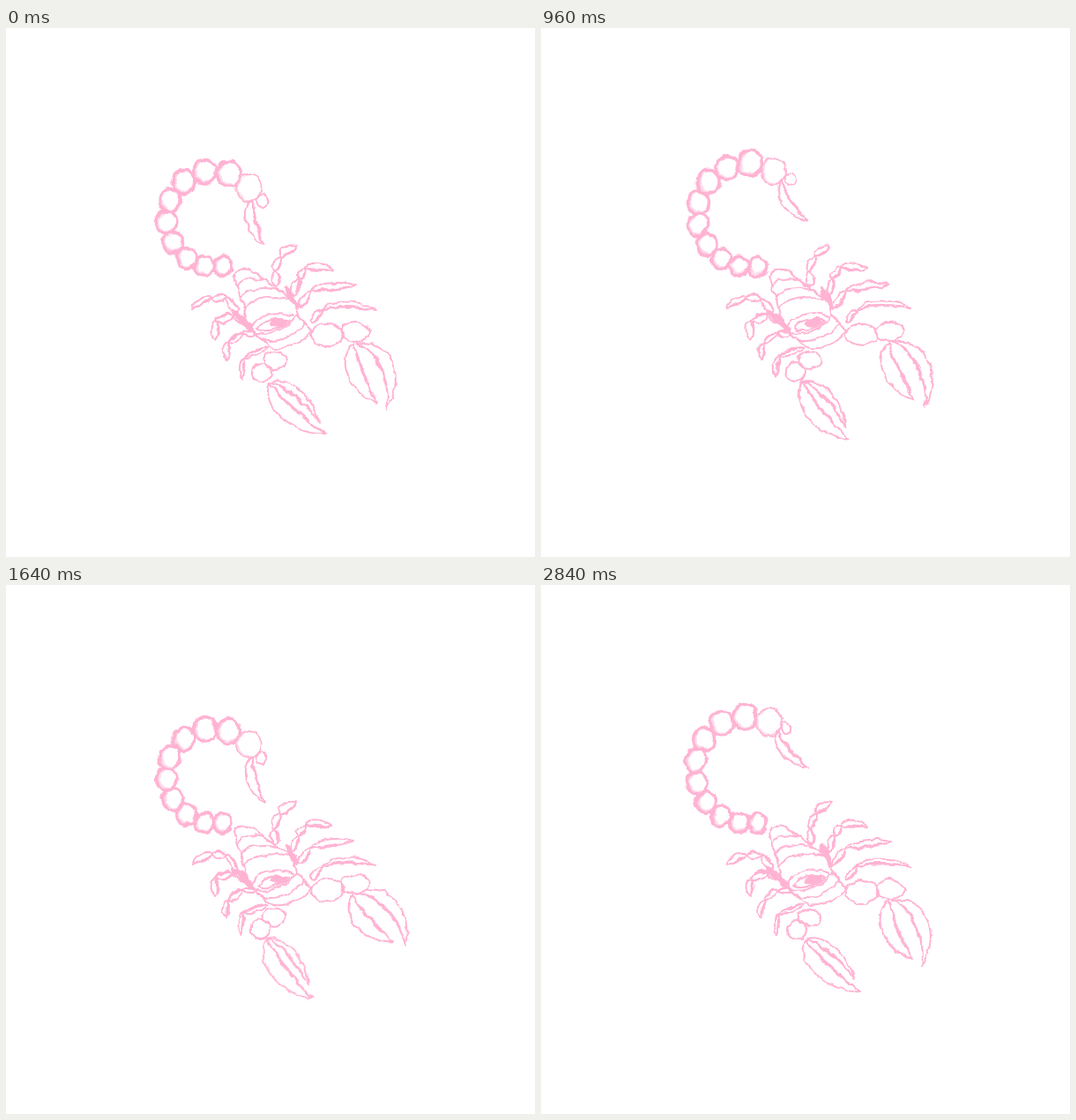
An HTML page that plays this animation: 600x600 px, repeating every 2880 ms.

```html
<!DOCTYPE html>
<html lang="en">
<head>
<meta charset="utf-8">
<title>Scorpion</title>
<style>
  html, body { margin: 0; width: 100%; height: 100%; overflow: hidden; background: #fff; }
  svg { display: block; width: 100vw; height: 100vh; }
  .ink { fill: none; stroke: #ffb3d3; stroke-width: 2; stroke-linejoin: round; stroke-linecap: round; }
  .solid { fill: #ffb3d3; }
  .rim { fill: #ffb3d3; stroke: none; }
  .light { fill: #fff; stroke: none; }
  .haze { fill: #ffdcea; stroke: none; }
  .joint { stroke-width: 13; }
</style>
</head>
<body>
<svg viewBox="0 0 600 600">
  <filter id="rough" filterUnits="userSpaceOnUse" x="0" y="0" width="600" height="600" color-interpolation-filters="sRGB">
    <feTurbulence id="noise" type="fractalNoise" baseFrequency=".09" numOctaves="2"/>
    <feDisplacementMap in="SourceGraphic" scale="6.5" xChannelSelector="R" yChannelSelector="G"/>
  </filter>
  <g class="ink" filter="url(#rough)">
    <g id="tail"></g>
    <g id="stinger"></g>
    <g id="body"></g>
    <g id="leftLegs"></g>
    <g id="lowLeg"></g>
    <g id="rightLegs"></g>
    <g id="leftArm"></g>
    <g id="leftClaw"></g>
    <g id="rightArm"></g>
    <g id="rightClaw"></g>
  </g>
</svg>
<script>
const LOOP = 2880, STEP = 40, SEGMENTS = 10, RAD = Math.PI / 180;
const $ = id => document.getElementById(id);
const path = (d, kind = "") => `<path class="${kind}" d="${d}"/>`;
const line = points => "M" + points.join(" ");
const add = (id, markup) => $(id).insertAdjacentHTML("beforeend", markup);
const oval = (x, y, rx, ry, kind = "") =>
  `<ellipse class="${kind}" cx="${x}" cy="${y}" rx="${rx}" ry="${ry}"/>`;

// A curve between two points, bowed sideways by `bow` and fullest near its start.
function edge([x0, y0], [x1, y1], bow) {
  const dx = x1 - x0, dy = y1 - y0, push = bow / .75 / Math.hypot(dx, dy);
  const at = k => [x0 + dx * k - dy * push, y0 + dy * k + dx * push];
  const a = at(.12), b = at(.7);
  return { there: `C${a} ${b} ${x1},${y1}`, back: `C${b} ${a} ${x0},${y0}` };
}
const arc = (a, b, bow) => path(`M${a}${edge(a, b, bow).there}`);
const lens = (a, b, bow1, bow2, kind) =>
  path(`M${a}${edge(a, b, bow1).there}${edge(a, b, bow2).back}Z`, kind);

// A pointed shape with a brushed shadow along its hollow side.
function leaf(a, b, width, bend = 0) {
  const side = bend > 0 ? -1 : 1, hollow = bend + side * width / 2;
  return lens(a, b, hollow, bend - side * width / 2) +
    lens(a, b, hollow, hollow - side * 2.5, "rim");
}

// Jointed limb from hip to tip; only the tip piece is bent.
function leg(id, width, bend, ...joints) {
  joints.slice(1).forEach((joint, i) =>
    add(id, leaf(joints[i], joint, width, i === joints.length - 2 ? bend : 0)));
}

function buildBody() {
  const upper = i => [[258 + 4 * i, 281 + 12.5 * i], [287 + 13 * i, 282 + 9 * i]];
  const lower = i => [[276 + 9 * i, 341 + 8 * i], [330 + 8 * i, 326 + 9 * i]];
  const bands = [0, 1, 2, 3].map(upper), folds = [0, 1, 2].map(lower);
  for (const [a, b] of bands) add("body", arc(a, b, -8));
  for (const [a, b] of folds) add("body", arc(a, b, 11));
  for (const side of [0, 1]) add("body", path(line([...bands, ...folds].map(band => band[side]))));
  add("body", arc([279, 341], [326, 327], -10) + lens([286, 341], [322, 332], -6, 5) +
    lens([300, 336], [318, 332], -4, 4, "solid") +
    lens([256, 322], [284, 347], -4, 2, "solid") + lens([318, 294], [331, 318], -2, 3, "solid"));
}

function buildLimbs() {
  leg("leftLegs", 8, 2, [263, 322], [249, 306], [233, 306], [211, 318]);
  leg("leftLegs", 9, 1, [274, 333], [256, 326], [238, 333], [238, 353]);
  leg("leftLegs", 7, 2, [284, 347], [268, 346], [252, 358], [251, 377]);
  leg("lowLeg", 6, 1, [297, 363], [270, 374], [268, 398]);
  leg("rightLegs", 9, -1, [307, 293], [305, 276], [311, 258], [330, 247]);
  leg("rightLegs", 8, -2, [326, 302], [332, 284], [340, 272], [371, 274]);
  leg("rightLegs", 8, -2, [332, 316], [346, 298], [396, 292]);
  leg("rightLegs", 7, -6, [346, 334], [358, 320], [420, 320]);

  add("leftArm", oval(305, 377, 13, 10) + oval(290, 391, 11, 11));
  add("rightArm", oval(364, 348, 18, 13) + oval(396, 345, 16, 11));
  add("leftClaw", leaf([299, 402], [362, 460], 18, 11.5) + leaf([300, 402], [355, 446], 9, -9));
  add("rightClaw", leaf([394, 358], [420, 424], 18, 10) + leaf([398, 358], [432, 432], 15, -20));
  add("stinger", leaf([5, 13], [18, 66], 11, 8) + oval(15, 15, 6, 7));
}

// The lowered tail curls round a centre; lifting it unrolls each link a little more.
function curl(i) {
  const angle = (81 + 21 * i + .6 * i * i) * RAD, radius = 56 - .06 * i * i;
  return [237 + radius * Math.cos(angle), 215 + radius * Math.sin(angle)];
}
const unroll = (i, lift) => -2.9 * i * lift;

function drawTail(lift) {
  const spine = [curl(0)];
  for (let i = 1; i < SEGMENTS; i++) {
    const [x, y] = spine[i - 1], [x0, y0] = curl(i - 1), [x1, y1] = curl(i);
    const turn = unroll(i - 1, lift) * RAD, dx = x1 - x0, dy = y1 - y0;
    spine.push([x + dx * Math.cos(turn) - dy * Math.sin(turn),
                y + dx * Math.sin(turn) + dy * Math.cos(turn)]);
  }
  let markup = path(line(spine.slice(0, -1)), "joint");
  spine.forEach(([x, y], i) => {
    const r = 12 + .35 * i, rim = i < SEGMENTS - 1 ? 3.5 : 1.8;
    markup += oval(x, y, r, r + 1, "rim") + oval(x, y, r - rim, r + 1 - rim, "haze") +
      oval(x + 1, y - .5, r - rim - 1, r - rim, "light");
  });
  $("tail").innerHTML = markup;
  const [x, y] = spine[SEGMENTS - 1];
  $("stinger").setAttribute("transform", `translate(${x} ${y}) rotate(${unroll(SEGMENTS - 1, lift)})`);
}

// Cosine easing between [time, value] turning points; the last value holds.
function swing(t, ...turns) {
  const i = turns.findIndex(turn => turn[0] > t);
  if (i < 0) return turns[turns.length - 1][1];
  const [[t0, v0], [t1, v1]] = turns.slice(i - 1, i + 1);
  return v0 + (v1 - v0) * (1 - Math.cos(Math.PI * (t - t0) / (t1 - t0))) / 2;
}

const pose = (id, angle, x, y, dx = 0, dy = 0) =>
  $(id).setAttribute("transform", `translate(${dx} ${dy}) rotate(${angle} ${x} ${y})`);

function draw(t) {
  const left = swing(t, [0, 0], [390, 1], [1300, 0], [2100, 1], [2840, 0]);
  const right = swing(t, [0, 0], [400, 1], [1000, .15], [1750, 1], [2840, 0]);
  drawTail(swing(t, [0, 0], [740, .84], [1640, 0], [2400, 1]));
  pose("lowLeg", 10 * left, 296, 362);
  pose("rightLegs", -4 * left, 335, 318);
  pose("leftArm", 8 * left, 310, 368);
  pose("leftClaw", 28 * left, 300, 402, -8 * left, -4 * left);
  pose("rightArm", -7 * right, 348, 345);
  pose("rightClaw", -21 * right, 397, 356, -3 * right, -7 * right);
}

const start = performance.now();
function tick() {
  const step = Math.floor((performance.now() - start) % LOOP / STEP);
  $("noise").setAttribute("seed", step + 1);
  draw(step * STEP);
  requestAnimationFrame(tick);
}

buildBody();
buildLimbs();
tick();
</script>
</body>
</html>
```
